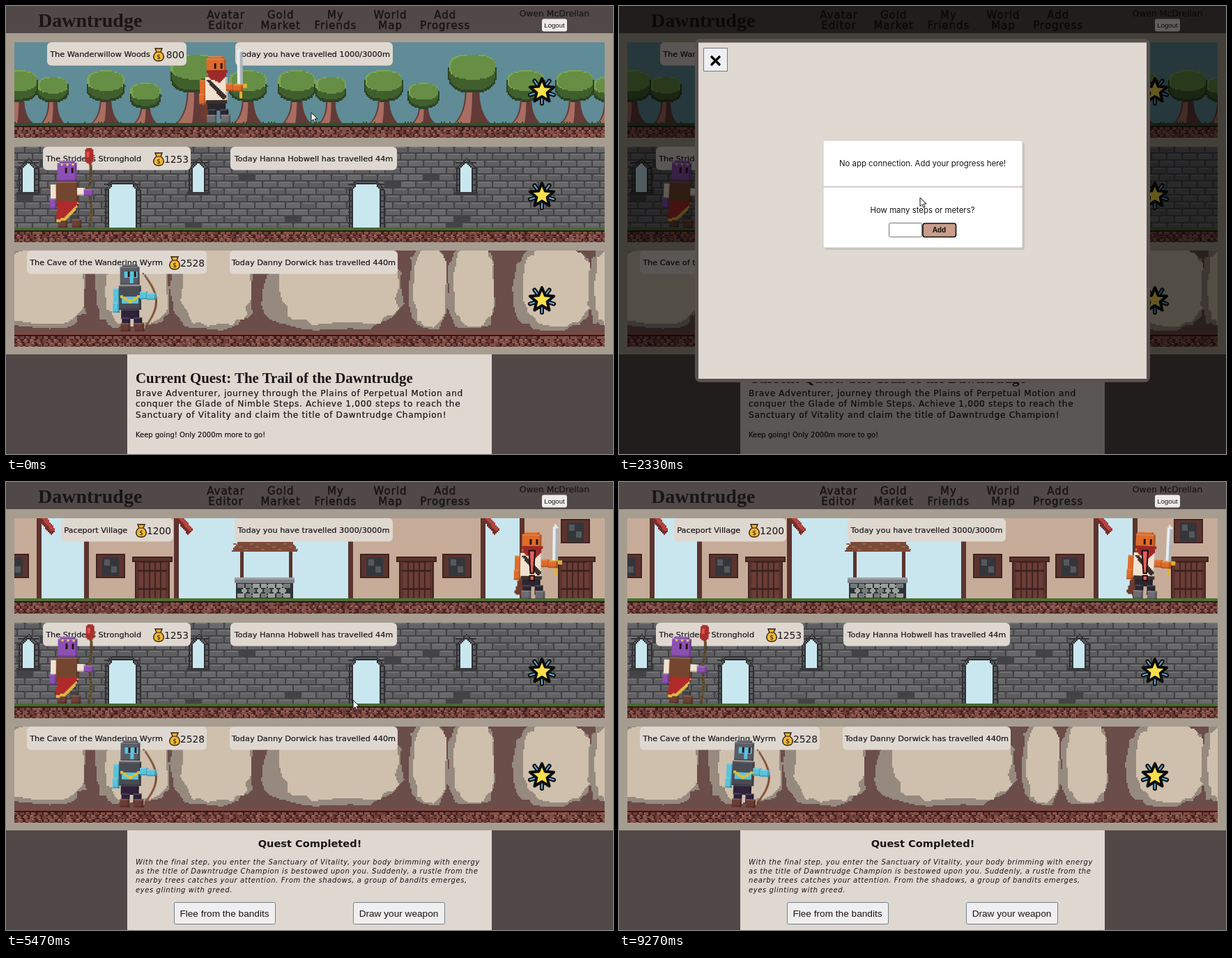
An HTML page with a canvas for the animation above (9.34 s loop, 871 by 643 pixels).

```html
<!DOCTYPE html>
<html lang="en">
<head>
<meta charset="utf-8">
<title>Dawntrudge</title>
<style>
html, body { margin: 0; width: 100%; height: 100%; overflow: hidden; }
body { position: relative; background: linear-gradient(#514947 39px, #a69d90 39px 500px, #514947 500px); }
canvas, svg { position: absolute; left: 0; top: 0; }
svg { width: 871px; height: 643px; }
text { font-family: "DejaVu Sans", sans-serif; fill: #191516; white-space: pre; }
.mid { text-anchor: middle; }
.nav { font-size: 15px; letter-spacing: 1px; stroke: #191516; stroke-width: .5px; }
.label { font-size: 11.3px; stroke: #191516; stroke-width: .2px; }
.gold { font-size: 13.8px; text-anchor: end; }
.body { font-size: 12.2px; letter-spacing: .65px; stroke: #191516; stroke-width: .2px; }
.tale { font-size: 10px; letter-spacing: .6px; font-style: italic; }
.title { font: bold 20.9px "Liberation Serif", serif; }
.logo { font: bold 28px "Liberation Serif", serif; }
.btn { font: 13.65px "Liberation Sans", sans-serif; text-anchor: middle; }
.form { font: 11.4px Inter, sans-serif; text-anchor: middle; }
</style>
</head>
<body>
<script>
const LOOP = 9340, OPEN = 1760, CLOSE = 5250;
const $ = id => document.getElementById(id);

let seed = 7;
const rnd = () => (seed = (seed * 16807) % 2147483647) / 2147483647;
const pick = list => list[Math.floor(rnd() * list.length)];

// Pixel-art helpers: shapes snap to 2px blocks
function layer(x, y, w, h, draw) {
  const c = document.createElement('canvas');
  c.width = w; c.height = h;
  c.style.left = x + 'px'; c.style.top = y + 'px';
  const g = c.getContext('2d');
  g.translate(-x, -y);
  draw(g);
  document.body.append(c);
  return c;
}
function box(g, color, x, y, w, h) {
  g.fillStyle = color;
  g.fillRect(x, y, w, h);
}
function poly(g, color, pts) {
  const ys = pts.map(p => p[1]), snap = v => Math.round(v / 2) * 2;
  for (let y = snap(Math.min(...ys)); y < Math.max(...ys); y += 2) {
    const xs = [], m = y + 1;
    pts.forEach(([x, a], i) => {
      const [u, b] = pts[(i + 1) % pts.length];
      if ((a <= m) !== (b <= m)) xs.push(x + (m - a) / (b - a) * (u - x));
    });
    xs.sort((a, b) => a - b);
    for (let i = 0; i + 1 < xs.length; i += 2) box(g, color, snap(xs[i]), y, snap(xs[i + 1]) - snap(xs[i]), 2);
  }
}
// Superellipse: power 1 is round, less is squarer; rough gives a scale per point
function blob(g, color, x, y, rx, ry, power = 1, rough = Array(24).fill(1)) {
  const bend = v => Math.sign(v) * Math.abs(v) ** power;
  poly(g, color, rough.map((k, i) => {
    const a = i / rough.length * Math.PI * 2;
    return [x + bend(Math.cos(a)) * rx * k, y + bend(Math.sin(a)) * ry * k];
  }));
}
function ground(g, y, grass) {
  box(g, '#43201f', 12, y, 847, 24);
  for (let r = 0; r < 4; r++)
    for (let x = 8 + r % 2 * 5; x < 860; x += 9) {
      const px = x + Math.floor(rnd() * 3), py = y + 5 + r * 5;
      blob(g, pick(['#6f3f3a', '#835048']), px + 4, py + 3, 4, 3);
      if (rnd() < .6) box(g, '#a06a61', px + 2, py, 3, 2);
    }
  box(g, grass, 12, y, 847, 4);
  box(g, '#2c1a17', 12, y + 4, 847, 2);
}

function tree(g, x, y, w) {
  const h = w * .8, lean = w / 56;
  for (let ty = y; ty < 168; ty += 2) {
    const s = (ty - y) / (168 - y), half = (8 + 13 * s ** 4) * lean;
    box(g, '#633a37', x - half, ty, half * 2, 2);
    box(g, '#a96d62', x - half + 2, ty, half * .8, 2);
  }
  blob(g, '#2c4426', x, y, w / 2, h / 2, .8);
  blob(g, '#415f2d', x, y - 1, w / 2 - 2, h / 2 - 3, .8);
  blob(g, '#7da553', x, y - h * .18, w / 2 - 1, h * .32, .8);
  blob(g, '#668f45', x + 1, y - h * .16, w / 2 - 3, h * .31, .8);
}
function forest(g) {
  box(g, '#5f8c96', 12, 52, 847, 137);
  for (let x = 0; x < 900; x += 399) {
    tree(g, x + 270, 97, 70);
    for (const dx of [18, 143, 347]) tree(g, x + dx, 115, 56);
    tree(g, x + 67, 120, 46);
    tree(g, x + 200, 129, 46);
  }
  ground(g, 168, '#34502a');
  for (let x = 12; x < 859; x += 4) if (rnd() < .4) box(g, '#34502a', x, 166, 2, 2);
}

function arch(g, x, y, w, h, flat) {
  const fill = (color, d) => poly(g, color, [[x + d, y + h], [x + d, y + 15], [x + w / 2 - flat, y + d],
    [x + w / 2 + flat, y + d], [x + w - d, y + 15], [x + w - d, y + h]]);
  fill('#2f2f32', 0);
  fill('#5a5a5e', 2);
  for (let i = y + 6; i < y + h; i += 8) box(g, '#353538', x, i, w, 2);
  fill('#2f2f32', 5);
  fill('#c9e7ee', 7);
}
function castle(g) {
  box(g, '#434346', 12, 202, 847, 137);
  for (let r = 0; r < 12; r++)
    for (let x = 6 - r % 2 * 11; x < 860; x += 22) {
      const y = 202 + r * 10;
      if (rnd() < .025) continue;
      box(g, pick(['#626265', '#68686b', '#5d5d60']), x, y, 20, 8);
      box(g, '#727275', x + 2, y, 16, 2);
    }
  for (const x of [17, 261, 645]) {
    arch(g, x, 218, 30, 50, 0);
    box(g, '#39393c', x - 2, 267, 34, 4);
  }
  for (const x of [141, 491]) arch(g, x, 249, 52, 70, 14);
  ground(g, 318, '#47692f');
}

function hollow(g, x, w) {
  const rough = Array.from({ length: 30 }, () => 1 - rnd() * .13);
  blob(g, '#968a7f', x, 405, w, 62, .6, rough);
  blob(g, '#cfc0ad', x + w * .1, 402, w * .85, 60, .65, rough.reverse());
}
function cave(g) {
  box(g, '#6b4d49', 12, 351, 847, 138);
  for (const [x, w] of [[45, 75], [182, 56], [295, 62], [470, 106], [606, 29], [668, 36], [786, 60], [870, 36]]) hollow(g, x, w);
  ground(g, 468, '#7b4944');
}

function village(g) {
  const wood = '#5c332e', dark = '#3f2421';
  const frame = (x, y, w, h, fill) => { box(g, dark, x, y, w, h); box(g, wood, x + 2, y + 2, w - 4, h - 4); box(g, fill, x + 9, y + 5, w - 18, h - 8); };
  const win = (x, y) => {
    frame(x, y, 42, 35, '#34363a');
    for (const i of [0, 1]) box(g, '#55585c', x + 12 + i * 10, y + 8 + i * 10, 8, 9);
  };
  const door = x => {
    frame(x + 4, 107, 50, 62, dark);
    frame(x, 107, 58, 8, wood);
    for (let i = 0; i < 5; i++) box(g, '#6b3d36', x + 10 + i * 8, 116, 6, 52);
    for (const y of [126, 152]) box(g, dark, x + 8, y, 42, 3);
  };
  const house = (x, w) => {
    box(g, '#c6ac98', x, 52, w, 116);
    for (const bx of [x, x + w - 7]) box(g, wood, bx, 52, 7, 116);
    poly(g, '#762d2c', [[x + w - 6, 52], [x + w + 6, 52], [x + w + 20, 70], [x + w + 13, 76]]);
    poly(g, '#b24440', [[x + w, 52], [x + w + 8, 52], [x + w + 20, 68], [x + w + 15, 71]]);
  };
  box(g, '#c9e6ee', 12, 52, 847, 137);
  for (const x of [112, 491]) {
    house(x, x < 200 ? 136 : 197);
    win(x + 17, 103);
    door(x + 69);
  }
  house(-40, 91); win(-9, 103);
  win(626, 103);
  house(737, 200); win(796, 53); door(788);
  // well
  for (const x of [336, 406]) box(g, wood, x, 98, 5, 40);
  poly(g, '#7c4a39', [[334, 85], [410, 85], [420, 101], [322, 101]]);
  for (let i = 0; i < 12; i++) box(g, '#9a6148', 326 + i * 8, 88 + i % 3 * 4, 5, 2);
  box(g, '#303336', 330, 144, 82, 24);
  for (let r = 0; r < 3; r++)
    for (let x = 337 + r % 2 * 5; x < 408; x += 11) blob(g, pick(['#9aa09c', '#777c7b']), x, 149 + r * 7, 5, 3.5);
  box(g, '#808287', 328, 137, 86, 8);
  box(g, '#a0a2a6', 328, 137, 86, 3);
  ground(g, 167, '#4d6f34');
}

// One shared body, measured from the middle of the head's top edge
function figure(cx, top, look) {
  return layer(cx - 36, top - 24, 84, 146, g => {
    const part = (color, x, y, w, h) => {
      box(g, color, x, y, w, h);
      box(g, '#ffffff28', x, y, w, 2);
      box(g, '#00000030', x + w - 3, y, 3, h);
      box(g, '#00000030', x, y + h - 2, w, 2);
    };
    g.translate(cx, top);
    if (look.cape) poly(g, look.cape, [[-16, 60], [-8, 60], [-14, 92], [-24, 88]]);
    part(look.legs, -13, 64, 26, 14);
    for (const s of [0, 1]) {
      part(look.legs, -12 + s * 17, 76, 12, 14);
      part(look.boots, -14 + s * 20, 84, 14, 12);
    }
    part(look.sleeve, -24, 34, 10, 22);
    part(look.skin, -25, 54, 10, 15);
    part(look.shirt, -16, 30, 32, 35);
    part(look.helm, -11, 0, 22, 4);
    part(look.helm, -14, 3, 28, 26);
    look.gear(g);
    for (const x of [-3, 6]) box(g, '#2b1416', x, 10, 3, 8);
    part(look.sleeve, 14, 39, 12, 11);
    part(look.skin, 24, 41, 14, 10);
  });
}
function heroGear(g) {
  poly(g, '#3c2c2b', [[-15, 34], [-9, 34], [14, 58], [10, 64]]);
  box(g, '#3c302e', -15, 63, 30, 5);
  poly(g, '#9c2a29', [[-15, 20], [16, 20], [14, 28], [4, 38], [-10, 32]]);
  poly(g, '#e6ecef', [[29, -6], [33, -12], [38, -6], [38, 42], [29, 42]]);
  box(g, '#aab4ba', 34, -6, 4, 48);
  box(g, '#e0b132', 20, 40, 24, 6);
  box(g, '#e0b132', 33, 46, 4, 15);
}
function wizardGear(g) {
  for (let y = 0; y < 96; y += 2) box(g, pick(['#54452d', '#66542f']), 31 + Math.round(Math.sin(y / 9)), y, 4, 2);
  blob(g, '#a82f2c', 32, -7, 7, 12, .8);
  box(g, '#d95249', 28, -13, 4, 8);
  poly(g, '#dcba45', [[-14, 58], [16, 58], [12, 70], [-4, 86], [-16, 88]]);
  poly(g, '#b02a2a', [[-14, 58], [16, 58], [10, 68], [-5, 82], [-16, 84]]);
  for (const x of [-9, -1, 7]) box(g, '#e5c964', x, 4, 3, 3);
}
function archerGear(g) {
  for (let y = 12; y < 92; y += 2) {
    box(g, '#7a4a30', 18 + 18 * Math.sin((y - 12) / 80 * Math.PI), y, 3, 2);
    box(g, '#cbc0b5', 20, y, 1, 2);
  }
  box(g, '#59c3dc', -8, 10, 19, 9);
  box(g, '#59c3dc', 0, 19, 5, 8);
  box(g, '#59c3dc', -12, 46, 24, 10);
  poly(g, '#d6c043', [[-14, 43], [0, 51], [14, 43], [14, 47], [0, 56], [-14, 47]]);
}

// Vector layers
const text = (cls, x, y, s, more = '') => `<text class="${cls}" x="${x}" y="${y}" ${more}>${s}</text>`;
const rect = (x, y, w, h, fill, more = '') => `<rect x="${x}" y="${y}" width="${w}" height="${h}" fill="${fill}" ${more}/>`;
const lines = (list, cls, y, step) => list.map((s, i) => text(cls, 186, y + i * step, s)).join('');
const plate = (x, y, w) => rect(x, y, w, 33.5, '#dfd8d1', 'rx="6"');
const place = (x, y, w, name, gold) => plate(x, y, w) + text('label', x + 4.2, y + 21, name) +
  `<use href="#bag" x="${x + w - 22 - 6 * gold.length}" y="${y + 18}"/>` + text('gold', x + w - 3, y + 23, gold);
const walked = (x, y, w, s) => plate(x, y, w) + text('label mid', x + w / 2, y + 21, s);
const ring = (n, r, off) => Array.from({ length: n }, (_, i) => {
  const a = (i / n + off) * Math.PI * 2, d = r[i % r.length];
  return [Math.sin(a) * d, -Math.cos(a) * d];
});
const rays = ring(5, [18], .1).map(p => 'M0 0L' + p).join('');
const star = y => `<g transform="translate(769 ${y})" stroke="#0c0c0c" stroke-linecap="round" stroke-linejoin="round">
  <path d="${rays}" stroke-width="6"/><path d="${rays}" stroke="#62abd6" stroke-width="2"/>
  <path d="M${ring(10, [18, 8], 0).join('L')}Z" fill="#f9e04b" stroke-width="4"/></g>`;
const button = (x, w, s) => rect(x + .5, 603.5, w, 31, '#efefef', 'stroke="#72808c" rx="2"') + text('btn', x + w / 2, 624, s);
const svg = s => document.body.insertAdjacentHTML('beforeend', `<svg>${s}</svg>`);

layer(12, 52, 847, 137, forest);
layer(12, 202, 847, 137, castle);
layer(12, 351, 847, 138, cave);
const town = layer(12, 52, 847, 137, village);

const menu = ['Avatar Editor', 'Gold Market', 'My Friends', 'World Map', 'Add Progress'];
const quest = ['Brave Adventurer, journey through the Plains of Perpetual Motion and',
  'conquer the Glade of Nimble Steps. Achieve 1,000 steps to reach the',
  'Sanctuary of Vitality and claim the title of Dawntrudge Champion!'];
const tale = ['With the final step, you enter the Sanctuary of Vitality, your body brimming with energy',
  'as the title of Dawntrudge Champion is bestowed upon you. Suddenly, a rustle from the',
  'nearby trees catches your attention. From the shadows, a group of bandits emerges,',
  'eyes glinting with greed.'];

svg(`<defs><g id="bag"><path d="M-3-4L-5-9H5L3-4C9 0 9 9 0 9S-9 0-3-4Z" fill="#f0b835" stroke="#2b1d12" stroke-width="1.4"/>
    <path d="M-3.5-4H3.5" stroke="#7a4a1c" stroke-width="1.6"/>${text('mid', 0, 6, '$', 'font-size="9"')}</g></defs>` +
  rect(590, 0, 79, 39, '#a59fa0', 'rx="4" id="hover"') +
  text('logo', 46, 30, 'Dawntrudge') +
  menu.map((m, i) => m.split(' ').map((w, j) => text('nav mid', 315.5 + i * 78.7, 17.5 + j * 15.5, w)).join('')).join('') +
  text('label mid', 787, 15, 'Owen McDrellan', 'style="font-size:12.3px"') +
  rect(769, 18.5, 36, 18, '#efebe8', 'rx="3"') + text('btn', 787, 31, 'Logout', 'style="font-size:9.6px"') +
  place(53, 202, 212, "The Strider's Stronghold", '1253') + walked(322, 202, 239, 'Today Hanna Hobwell has travelled 44m') +
  place(30, 351, 258, 'The Cave of the Wandering Wyrm', '2528') + walked(321, 351, 241, 'Today Danny Dorwick has travelled 440m') +
  star(272) + star(422) + rect(174, 500, 523, 143, '#dfd8d1') +
  `<g id="before">${place(59, 52, 200, 'The Wanderwillow Woods', '800')}
    ${walked(329, 52, 226, 'Today you have travelled 1000/3000m')}${star(122)}
    ${text('title', 186, 541, 'Current Quest: The Trail of the Dawntrudge')}${lines(quest, 'body', 559.5, 15.8)}
    ${text('label', 186, 619, 'Keep going! Only 2000m more to go!', 'style="font-size:10px"')}</g>
  <g id="after">${place(79, 52, 161, 'Paceport Village', '1200')}
    ${walked(328, 52, 227, 'Today you have travelled 3000/3000m')}
    ${text('mid', 436, 524, 'Quest Completed!', 'font-size="14.6" font-weight="bold"')}${lines(tale, 'tale', 548.5, 13.4)}
    ${button(241, 145, 'Flee from the bandits')}${button(498, 131, 'Draw your weapon')}</g>`);

const cast = [
  figure(302, 72, { skin: '#de6b29', helm: '#de6b29', shirt: '#f0e2cf', sleeve: '#de6b29', legs: '#2b2731', boots: '#6c6c71', cape: '#6d3c2e', gear: heroGear }),
  figure(88, 222, { skin: '#8c50b2', helm: '#8c50b2', shirt: '#75462f', sleeve: '#f0e2cf', legs: '#474347', boots: '#6d4033', gear: wizardGear }),
  figure(178, 371, { skin: '#59c3dc', helm: '#5a5d66', shirt: '#4a4c54', sleeve: '#59c3dc', legs: '#2f213a', boots: '#6b3b35', gear: archerGear })
];

svg(`<path id="alert" d="M750.5 98.5H759L757 131H752.5ZM751.5 134.5H758V141.5H751.5Z" fill="#e4605a" stroke="#1c0c0c" stroke-width="2" stroke-linejoin="round"/>
  <g id="modal">${rect(0, 0, 871, 643, '#000', 'opacity=".6"')}
    ${rect(109, 47, 653, 493, '#59514e', 'rx="8"')}${rect(114, 52.5, 643, 482.5, '#e0d9d2')}
    ${rect(121.5, 60.5, 34, 33, '#efeff2', 'stroke="#75797f"')}
    <path d="M132 72L145 85M145 72L132 85" stroke="#000" stroke-width="3.2"/>
    ${rect(296, 196, 286, 154, '#c9c2bd', 'rx="3"')}
    ${rect(293, 193, 286, 66, '#fff', 'stroke="#cfcbc8" rx="2"')}${rect(293, 260, 286, 87, '#fff', 'stroke="#cfcbc8" rx="2"')}
    ${text('form', 435.5, 230, 'No app connection. Add your progress here!')}
    ${text('form', 435.5, 297, 'How many steps or meters?')}
    ${rect(387.5, 311.5, 47, 20, '#fff', 'rx="2" id="field"')}
    ${text('', 391.5, 325, '', `id="steps" style="font:9.3px 'Noto Sans',sans-serif"`)}
    <g id="spin">${rect(420, 315, 10, 13, '#efefef')}<path d="M422.5 320L425 317L427.5 320ZM422.5 323L425 326L427.5 323Z" fill="#505050"/></g>
    ${rect(436, 312, 47.5, 19.5, '#c99d8c', 'stroke="#111" stroke-width="1.6" rx="3"')}
    ${text('form', 459.5, 325.3, 'Add', 'style="font-size:9.8px;font-weight:700"')}</g>
  <g id="status">${rect(0, 628, 62, 15, '#3a3a3c', 'rx="2"')}${text('', 4, 639, 'localhost:3000', `style="font:9px 'Liberation Sans',sans-serif;fill:#d6d6d6"`)}</g>
  <g id="mouse" fill="#fff" stroke="#111" stroke-linejoin="round"><path id="arrow" d="M0 0V12.5L2.9 9.8L4.9 14.3L7 13.4L5 9H9Z"/>
    <path id="hand" d="M0 0C1 0 1.6.6 1.6 1.6V6.4L5.6 7.4C7 7.8 7.6 8.5 7.4 10L6.6 14.4L5.6 17H-1.5L-5 11C-5.6 9.8-4.4 8.6-3.2 9.6L-1.6 11V1.6C-1.6.6-1 0 0 0Z"/>
    <path id="beam" fill="none" d="M-2.5-6.5H2.5M0-6.5V6.5M-2.5 6.5H2.5"/></g>`);

// Pointer stops: arrival time, x, y and how long it rests there
const stops = [[0, 438, 153, 150], [1300, 626, 24, 400], [2040, 552, 149, 0], [2330, 432, 275, 0],
  [2800, 404, 322, 1300], [4600, 473, 324, 650], [6470, 763, 197, 0], [7150, 812, 190, LOOP]];
const within = (t, a, b) => t >= a && t < b;
const show = (id, on) => { $(id).style.display = on ? '' : 'none'; };

function pointer(t) {
  const i = stops.findLastIndex(s => s[0] <= t);
  const [t0, x, y, rest] = stops[i], [t1, nx, ny] = stops[i + 1] || stops[i];
  const k = Math.max(0, (t - t0 - rest) / (t1 - t0 - rest || 1)), e = k * k * (3 - 2 * k);
  $('mouse').setAttribute('transform', `translate(${x + (nx - x) * e} ${y + (ny - y) * e})`);
  const hand = within(t, 1140, OPEN) || within(t, 4420, CLOSE), beam = within(t, 2720, 4300);
  show('hand', hand);
  show('beam', beam);
  show('arrow', !hand && !beam);
  show('mouse', t < 7150);
}

function tick(now) {
  const t = now % LOOP, done = t >= CLOSE, focus = t >= 2880;
  const swing = 3.6 * (.5 + .5 * Math.cos((t - 300) / 500 * Math.PI)) ** 3 - .7;
  for (const c of cast) c.style.transform = `rotate(${swing}deg)`;
  cast[0].style.left = (done ? 718 : 266) + 'px';
  town.style.display = done ? '' : 'none';
  show('before', !done);
  show('after', done);
  show('alert', done);
  show('hover', within(t, 1140, OPEN));
  show('status', within(t, 1400, 2140));
  show('modal', within(t, OPEN, CLOSE));
  show('spin', focus);
  $('field').setAttribute('stroke', focus ? '#111' : '#767676');
  $('field').setAttribute('stroke-width', focus ? 2 : 1);
  $('steps').textContent = '2000'.slice(0, Math.max(0, Math.floor((t - 3000) / 210)));
  pointer(t);
  requestAnimationFrame(tick);
}
tick(performance.now());
</script>
</body>
</html>
```
